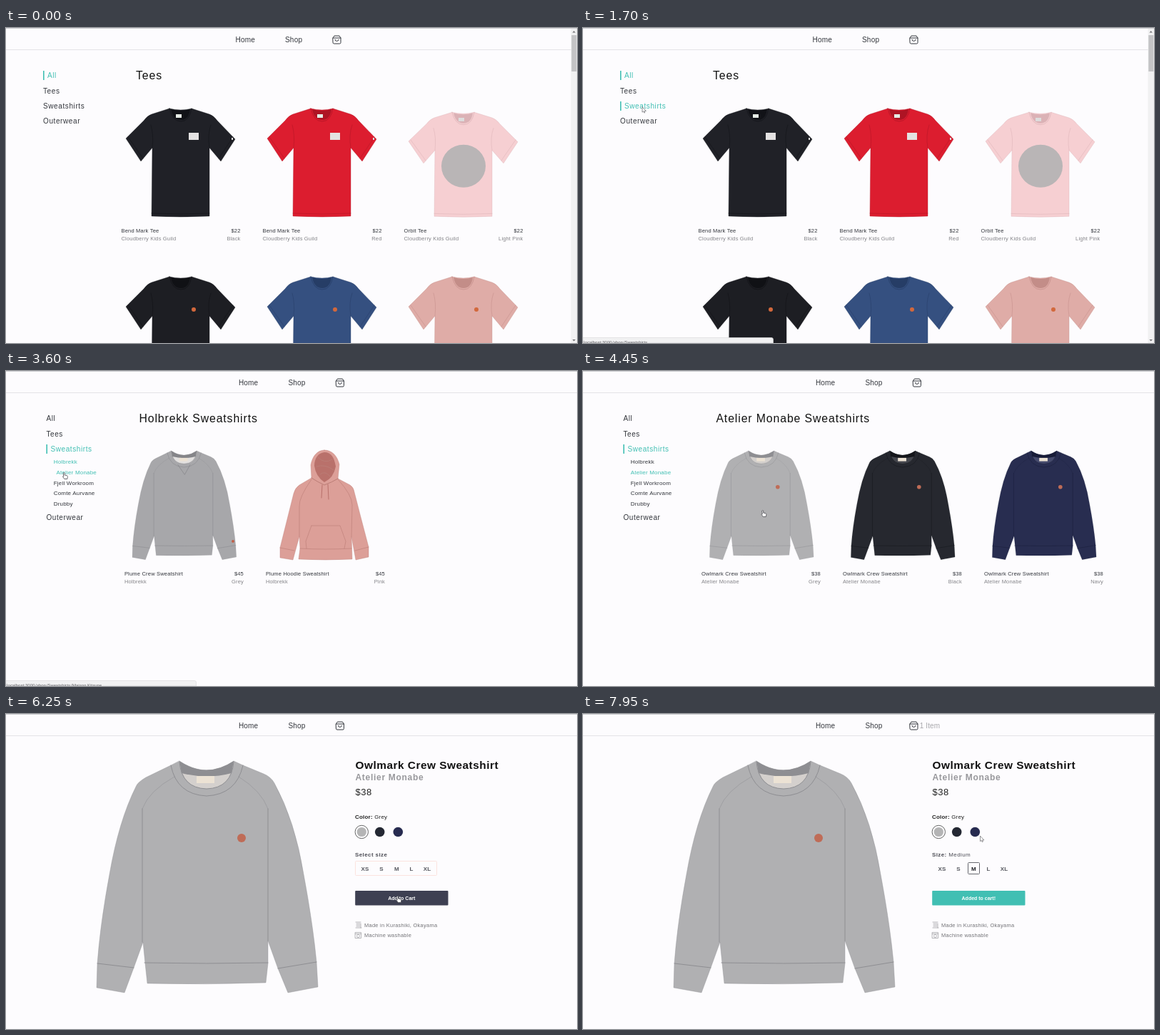
These frames come from a looping animation (800 px wide and 442 px high, 8000 ms). An HTML page:

```html
<!DOCTYPE html>
<html lang="en">
<head>
<meta charset="utf-8">
<title>Shop</title>
<style>
html, body { margin: 0; width: 100%; height: 100%; overflow: hidden; background: #fdfcfe; }
svg { display: block; width: 100vw; height: 100vh; font-family: "Liberation Sans", sans-serif; }
</style>
</head>
<body>
<svg id="stage" viewBox="0 0 800 442" xmlns="http://www.w3.org/2000/svg"></svg>
<script>
const LOOP = 8000, TEAL = '#41bfb3', INK = '#33363c', GREY = '#858589', SHIFT = 4.4;
const stage = document.getElementById('stage');

// Markup helpers
const text = (x, y, s, size, fill = INK, extra = '') =>
  `<text x="${x}" y="${y}" font-size="${size}" fill="${fill}" ${extra}>${s}</text>`;
const gap = n => `letter-spacing="${n}"`;
const bold = n => `font-weight="700" ${gap(n)}`;
const path = (d, fill = 'none', stroke = 'none', w = 1) =>
  `<path d="${d}" fill="${fill}" stroke="${stroke}" stroke-width="${w}" stroke-linejoin="round" stroke-linecap="round"/>`;
const rect = (x, y, w, h, fill, extra = '') =>
  `<rect x="${x}" y="${y}" width="${w}" height="${h}" fill="${fill}" ${extra}/>`;
const dot = (x, y, r, fill, extra = '') => `<circle cx="${x}" cy="${y}" r="${r}" fill="${fill}" ${extra}/>`;
const group = (body, attrs = '') => `<g ${attrs}>${body}</g>`;
const place = (body, move) => group(body, `transform="${move}"`);

// Garments
function tee(color, dark, mark) {
  return path('M229 113L204 121Q198 123 193 130L168 155L189 187L205 168L204 264Q245 266 285 264L285 168L301 187L321 156L296 130Q291 123 285 121L260 113Q245 117 229 113Z', color, dark, .4) +
    path('M205 168Q207 150 203 136M285 168Q282 150 287 136M171 153L192 183M318 153L298 183M204 260Q245 262 285 260', 'none', dark, .5) +
    path('M231 114Q245 118 258 114Q256 129 245 129Q234 129 231 114Z', dark) +
    path('M229 113Q233 131 245 131Q257 131 260 113', 'none', dark, .7) + mark;
}

function crew(color, dark, inner, mark = '') {
  return path('M243 66Q281 92 319 66L332 72L361 84Q371 88 376 97Q405 150 417 225Q430 295 435 348L437 383L395 391L381 357L367 318L367 350L364 377Q281 380 198 378L195 350L192 320L179 356L166 391L127 384L128 350Q132 295 145 225Q158 150 182 102Q184 96 196 89L231 72Z', color, dark, .4) +
    path('M243 67Q281 91 319 67Q316 104 281 105Q247 104 243 67Z', inner) +
    path('M243 66Q281 91 319 66L316 83Q281 92 246 83Z', dark) +
    path('M243 67Q246 104 281 105Q316 104 319 67M231 72Q239 113 281 115Q323 113 332 72', 'none', dark, 1) +
    group(path('M236 88Q200 108 191 133M326 88Q358 108 367 133', 'none', dark, 1), 'opacity=".5"') +
    path('M191 133V320M367 133V318M194 349Q281 351 367 349M128 350L179 356M381 357L435 348', 'none', dark, 1) +
    rect(267, 87, 25, 10, '#ece2d4') + mark;
}

function hoodie(color, dark, inner) {
  return path('M446 111C436 111 429 120 427 132L428 150L411 160Q405 164 403 172L393 212L384 248L384 262L402 265L411 232L412 249L410 264Q447 266 485 264L484 232L490 265L508 261L508 247L497 205L488 170Q487 163 482 160L465 151L467 131C464 119 457 111 446 111Z', color, dark, .4) +
    path('M446 114C437 115 432 123 432 133Q434 148 446 156Q459 150 462 134C460 122 456 114 446 114Z', inner) +
    path('M437 121Q446 131 457 124M435 134Q447 130 459 139M440 145Q447 139 454 148M428 150Q437 156 446 160Q457 156 465 151', 'none', dark, 1) +
    path('M411 232L411 190Q410 178 428 152M484 232L485 188Q485 174 465 152M412 249Q447 251 484 249M384 248L404 252M489 252L508 247M428 217H468L476 239L474 249M428 217L420 239L421 249', 'none', dark, .6) +
    path('M443 160L442 178M451 159L452 180', 'none', inner, 1);
}

const small = (x, y, sx = .47) => `translate(${x - 127 * sx} ${y - 31}) scale(${sx} .47)`;
const foxMark = dot(330, 174, 6, '#bf6c57');
const foxGrey = crew('#b0b0b2', '#8e8e92', '#d4d0cd', foxMark);
const seamGrey = crew('#a7a7aa', '#858589', '#e2e0df',
  path('M263 108L283 137L299 108', 'none', '#858589', 1.5) + dot(427, 336, 4, '#c25d45'));
const rosy = hoodie('#dc9f98', '#bb7d76', '#b9716b');
const chest = rect(256, 147, 14, 10, '#e4e2e2') + rect(238, 121, 8, 5, '#e6ece6') + rect(316, 154, 2, 3, '#ddd');
const pocketMark = dot(263, 159, 3, '#d2683c');

function label(col, name, price, brand, shade) {
  const l = 161.5 + col * 198, r = l + 167, end = 'text-anchor="end" ' + gap(.15);
  return text(l, 286.6, name, 7.5, INK, gap(.2)) + text(r, 286.6, price, 7.5, INK, end) +
    text(l, 297.6, brand, 7.5, GREY, gap(.18)) + text(r, 297.6, shade, 7.5, GREY, end);
}
const title = s => text(182, 72, s, 15.8, '#111', gap(.9));

// Pages: [start, end, markup]
const guild = 'Cloudberry Kids Guild', fjell = 'Fjell Workroom', holb = 'Holbrekk', mon = 'Atelier Monabe';
const owl = 'Owlmark Crew Sweatshirt';
const pages = [
  [0, 1900, title('Tees') +
    tee('#202127', '#111217', chest) +
    place(tee('#dc1d2f', '#ae1424', chest), 'translate(198 0)') +
    place(tee('#f6cfd2', '#dbb2b6', rect(238, 121, 8, 5, '#ddd') + dot(245, 191, 31, '#b9b5b6')), 'translate(396 9) scale(1 .967)') +
    [['#1d1e23', '#101115'], ['#355080', '#263d66'], ['#dfaca7', '#c38d88']].map((c, i) =>
      place(tee(...c, pocketMark), `translate(${i * 198} 236)`)).join('') +
    label(0, 'Bend Mark Tee', '$22', guild, 'Black') +
    label(1, 'Bend Mark Tee', '$22', guild, 'Red') +
    label(2, 'Orbit Tee', '$22', guild, 'Light Pink')],
  [1900, 3000, title('Sweatshirts') +
    place(crew('#d2d2d5', '#b2b2b7', '#e8e4dc'), small(177, 112, .44)) +
    place(crew('#303d6b', '#1f2a50', '#e4e5e6', rect(348, 366, 9, 9, '#e6e6e6')), small(375, 112, .44)) +
    place(hoodie('#542d33', '#391b21', '#1d1215'), 'translate(224 0) scale(.93 1)') +
    place(seamGrey, small(177, 348)) +
    place(rosy, 'translate(-5 236)') +
    place(foxGrey, small(572, 348)) +
    label(0, 'Dovel Crew Sweatshirt', '$55', fjell, 'Light Grey') +
    label(1, 'Dovel Crew Sweatshirt', '$55', fjell, 'Navy') +
    label(2, 'Dovel Hoodie Sweatshirt', '$55', fjell, 'Burgundy')],
  [3000, 3800, title(holb + ' Sweatshirts') +
    place(seamGrey, small(177 - SHIFT, 112)) +
    place(rosy, `translate(${-SHIFT} 0)`) +
    label(0, 'Plume Crew Sweatshirt', '$45', holb, 'Grey') +
    label(1, 'Plume Hoodie Sweatshirt', '$45', holb, 'Pink')],
  [3800, 4700, title(mon + ' Sweatshirts') +
    place(foxGrey, small(173, 112)) +
    place(crew('#26282f', '#15161b', '#44464d', foxMark), small(371, 112)) +
    place(crew('#282d50', '#181c38', '#454a6c', foxMark), small(569, 112)) +
    label(0, owl, '$38', mon, 'Grey') +
    label(1, owl, '$38', mon, 'Black') +
    label(2, owl, '$38', mon, 'Navy')],
  [4700, LOOP, place(detail(), `translate(${-SHIFT} 0)`)]
];

function detail() {
  const sizes = [['XS', 503], ['S', 526], ['M', 547.5], ['L', 568], ['XL', 590]];
  return foxGrey +
    text(489.5, 77, owl, 15.4, '#111', bold(.5)) +
    text(489.5, 93, mon, 12, '#98989c', bold(.7)) +
    text(489.5, 114, '$38', 13, '#222', gap(.5)) +
    text(489, 147.4, '<tspan font-weight="700">Color:</tspan> Grey', 8, '#222', gap(.2)) +
    dot(498.3, 165.5, 9.2, 'none', 'stroke="#555" stroke-width=".9"') + dot(498.3, 165.5, 6.6, '#b4b4b5') +
    dot(523.7, 165.5, 6.8, '#242833') + dot(549.3, 165.5, 6.8, '#272b50') +
    '<text id="pick" x="489" y="200.4" font-size="8" letter-spacing=".4"></text>' +
    rect(489.5, 206.5, 114, 20, 'none', 'id="warn" stroke="#fbe3df" rx="1"') +
    rect(539.5, 208.5, 16, 16, 'none', 'id="chosen" stroke="#66686e" rx="1"') +
    sizes.map(([s, x]) => text(x, 219.6, s, 8, '#55575e', `text-anchor="middle" id="size${s}" ` + bold(.2))).join('') +
    rect(489.2, 248, 130.3, 20.6, '#262838', 'id="button" rx="1"') +
    '<text id="action" x="554.3" y="260.7" font-size="7" font-weight="700" fill="#fff" text-anchor="middle"></text>' +
    path('M490 292H497M490 300H498M491 294H496M491 296H496M491 298H496M497 294V300', 'none', '#98989c', .7) +
    path('M489.5 306.5H497.5V314.5H489.5ZM489.5 308.5H497.5', 'none', '#98989c', .7) +
    dot(493.5, 311.5, 2, 'none', 'stroke="#98989c" stroke-width=".7"') +
    text(502, 298.7, 'Made in Kurashiki, Okayama', 7.5, '#747478', gap(.25)) +
    text(502, 312.7, 'Machine washable', 7.5, '#747478', gap(.25));
}

// Side menu: name, y, hover span, active span, nested
const menu = [
  ['All', 70, 0, 0, 0, 1900],
  ['Tees', 91.6, 1180, 1330, 0, 0],
  ['Sweatshirts', 113, 1330, 2250, 1900, 4700],
  [holb, 130.2, 2250, 3250, 3000, 3800, true],
  [mon, 144.8, 3250, 3950, 3800, 4700, true],
  [fjell, 159.7, 0, 0, 0, 0, true],
  ['Comte Aurvane', 174.4, 0, 0, 0, 0, true],
  ['Drubby', 189.3, 0, 0, 0, 0, true],
  ['Outerwear', 134.4, 0, 0, 0, 0]
];
const menuRow = ([name, y, , , , , nested]) => group(
  (nested ? '' : rect(52, y - 10, 1.6, 13, TEAL)) +
  text(nested ? 62.3 : 52, y, name, nested ? 8 : 10, INK, gap(nested ? .2 : .6)), 'class="row"');

const url = 'localhost:3000/shop/Sweatshirts';
// Status line: start, address
const links = [
  [0, url],
  [2300, url + '/Carhartt'],
  [3300, url + '/Maison Kitsune'],
  [4400, url + '/Maison Kitsune/Foxhead Crew Sweatshirt/Grey']
];

// Pointer stops: time, x, y
const stops = [
  [100, 806, 250], [1150, 90, 98], [1500, 83, 111], [2000, 83, 111], [2450, 79.5, 126],
  [3100, 79.5, 126], [3450, 79.5, 142], [3850, 79.5, 142], [4450, 250, 195], [4750, 250, 195],
  [5150, 441, 219], [5350, 441, 219], [5900, 547, 255], [6350, 547, 255], [6750, 546, 213],
  [7000, 546, 213], [7350, 549, 255], [7550, 549, 255], [7900, 556.5, 171.5]
];
// Spans in which the pointer is a hand
const hands = [[1750, 4000], [4400, 4700], [5800, 6420], [6650, 7060], [7280, 7620]];

stage.innerHTML =
  rect(0, 0, 800, 442, '#fdfcfe') +
  group(pages.map(p => group(p[2], 'class="page"')).join('') +
    group(menu.map(menuRow).join(''), 'id="menu"'), 'id="content"') +
  rect(0, 0, 800, 1, '#cfcfd2') + rect(0, 30, 800, 1, '#e4e3e7') +
  group(text(321.5, 20.2, 'Home', 10, INK, gap(.2)) + text(391, 20.2, 'Shop', 10, INK, gap(.2)) +
    text(0, 20.2, '1 Item', 10, '#a6a6aa', 'id="item" ' + gap(.1)) +
    group(path('M458 14L460 11H467L469 14V20.5Q469 22 467.5 22H459.5Q458 22 458 20.5ZM458 14H469M461 16.3Q461 18.4 463.5 18.4Q466 18.4 466 16.3', '#fdfcfe', INK, 1), 'id="bag"'),
    'id="nav"') +
  group(rect(791.5, 1, 8.5, 441, '#f1f1f2') + rect(792.3, 10, 7, 50, '#c3c3c5', 'id="thumb"') +
    path('M793.5 6.5L795.7 4L798 6.5ZM793.5 437L795.7 439.5L798 437Z', '#77777a'), 'id="scroll"') +
  group(path('M0 434.5H264Q266.5 434.5 266.5 437V442H0Z', '#f1f1f2', '#d8d8db', .6) +
    '<text id="link" x="1" y="443" font-size="6" font-family="Roboto, sans-serif" fill="#66666a"></text>', 'id="status"') +
  group(path('M0 0V7.2L1.7 5.8L2.8 8.1L3.9 7.6L2.9 5.4H5Z', '#fff', '#66666b', .7).replace('<path', '<path id="arrow"') +
    path('M1 1Q2 0 2.7 1V4L6 4.8Q7 5.2 6.8 6.5L6.3 9.5H2.3L0 6.3Q0 5.2 1 5.8Z', '#fff', '#4a4a50', .8).replace('<path', '<path id="hand"'),
    'id="pointer"');

const $ = id => document.getElementById(id);
const all = c => [...stage.getElementsByClassName(c)];
const pageEls = all('page'), rowEls = all('row');
const within = (t, a, b) => t >= a && t < b;
const clamp = v => Math.max(0, Math.min(1, v));
const ease = v => { v = clamp(v); return v * v * (3 - 2 * v); };
const span = (t, a, b, d = 150) => b > a ? ease((t - a) / d) * (1 - ease((t - b) / d)) : 0;
const show = (el, on) => el.style.display = on ? '' : 'none';
const set = (el, key, v) => el.setAttribute(key, v);
const move = (el, x, y = 0) => set(el, 'transform', `translate(${x} ${y})`);

function drawMenu(t) {
  const open = within(t, 1900, 4700);
  show($('menu'), t < 4700);
  menu.forEach(([name, , from, to, on, off, nested], i) => {
    const row = rowEls[i], label = row.lastChild;
    const active = within(t, on, off), hover = span(t, from, to);
    const k = active && !nested ? 1 : hover;
    show(row, !nested || open);
    move(label, k * (nested ? 3.7 : 6));
    set(label, 'fill', active || hover > .5 ? TEAL : INK);
    if (!nested) set(row.firstChild, 'opacity', k);
    if (name === 'Outerwear') move(row, 0, open ? 74.3 : 0);
  });
}

function drawDetail(t) {
  const warned = t >= 6050, picked = t >= 6900, added = t >= 7450;
  $('pick').innerHTML = picked
    ? '<tspan font-weight="700">Size:</tspan> Medium'
    : `<tspan font-weight="700">Select ${warned ? 's' : 'S'}ize</tspan>`;
  set($('pick'), 'fill', warned ? '#4c4d55' : '#26272d');
  show($('warn'), warned && !picked);
  show($('chosen'), picked);
  set($('sizeM'), 'fill', picked ? '#1c1d22' : '#55575e');
  const hover = within(t, 5820, 6420) || within(t, 7280, 7450);
  set($('button'), 'fill', added ? TEAL : hover ? '#3e4052' : '#262838');
  $('action').textContent = added ? 'Added to cart!' : 'Add to Cart';
}

function drawPointer(t) {
  const next = stops.findIndex(s => s[0] > t), i = next < 0 ? stops.length - 1 : next;
  const a = stops[Math.max(0, i - 1)], b = stops[i];
  const k = b === a ? 0 : ease((t - a[0]) / (b[0] - a[0]));
  move($('pointer'), a[1] + (b[1] - a[1]) * k, a[2] + (b[2] - a[2]) * k);
  const hand = hands.some(([p, q]) => within(t, p, q));
  show($('hand'), hand);
  show($('arrow'), !hand);
}

function draw(t) {
  const wide = t >= 3000, dx = wide ? SHIFT : 0;
  pages.forEach(([a, b], i) => show(pageEls[i], within(t, a, b)));
  move($('content'), dx);
  move($('nav'), dx);
  show($('scroll'), !wide);
  set($('thumb'), 'height', t < 1900 ? 51 : 146);
  drawMenu(t);
  drawDetail(t);

  $('link').textContent = links.filter(l => l[0] <= t).pop()[1];
  set($('status'), 'opacity', Math.max(span(t, 1350, 4050), span(t, 4450, 5150)));

  const k = ease((t - 7600) / 380);
  move($('bag'), -4.5 * k);
  move($('item'), 460 + 7.5 * k);
  set($('item'), 'opacity', k);
  drawPointer(t);
}

const start = performance.now();
function tick() {
  draw((performance.now() - start) % LOOP);
  requestAnimationFrame(tick);
}
tick();
</script>
</body>
</html>
```
